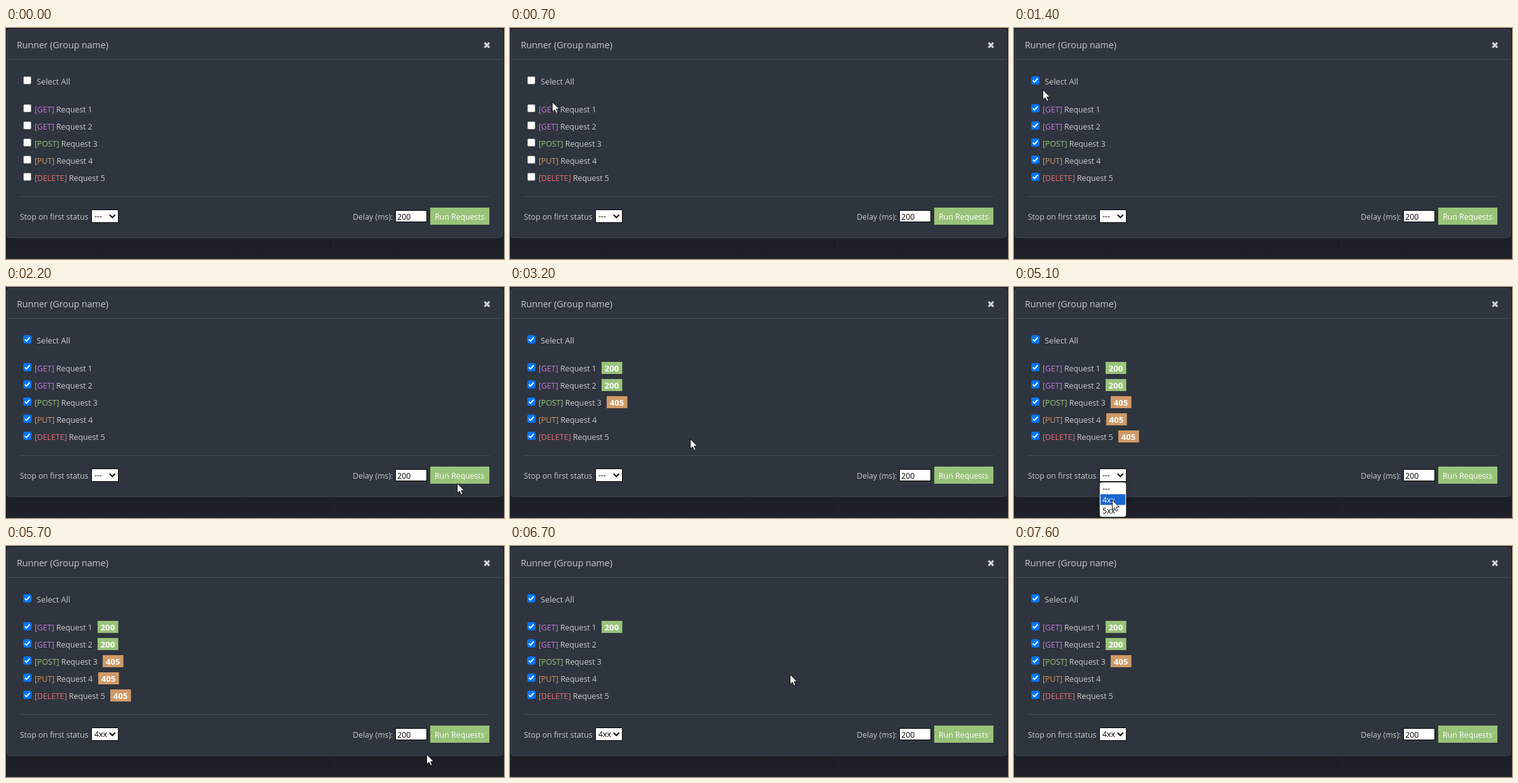
An HTML page that plays this animation: 783x364 px, repeating every 8000 ms.

```html
<!DOCTYPE html>
<html lang="en">
<head>
<meta charset="utf-8">
<title>Request runner</title>
<style>
  html, body { margin: 0; width: 100%; height: 100%; overflow: hidden; background: #1f222a; }
  svg { display: block; width: 783px; height: 364px; }
  text { font: 12.3px "Open Sans", "Noto Sans", sans-serif; fill: #c8cacd; white-space: pre; }
  .title { font-size: 14.2px; }
  .all { font-size: 12.7px; }
  .field { fill: #000; }
  .badge text { font-size: 13px; font-weight: 700; fill: #fff; }
  .frame { fill: #0002; stroke: #43484f; stroke-width: 2; filter: drop-shadow(0 2px 5px #0006); }
</style>
</head>
<body>
<svg id="stage" viewBox="0 0 783 364">
  <defs>
    <linearGradient id="shade" x2="0" y2="1">
      <stop offset="0" stop-color="#1b1e25"/>
      <stop offset="1" stop-color="#1f222a"/>
    </linearGradient>
  </defs>
  <rect width="783" height="364" fill="#1f222a"/>
  <rect y="328" width="783" height="36" fill="url(#shade)"/>
  <path d="M515.5 331V364" stroke="#252830"/>
  <rect x="1.5" y="2.5" width="779" height="328" rx="4" fill="#2f353e" stroke="#3d434c"/>
  <path d="M2 49.5H780M22 265.5H760" stroke="#474d56"/>
  <text class="title" x="17" y="32">Runner (Group name)</text>
  <path d="M752.4 23.2l7.6 7.6m0-7.6l-7.6 7.6" stroke="#d0d2d4" stroke-width="3.2"/>
  <text class="all" x="48.3" y="89">Select All</text>
  <g id="rows"></g>

  <text x="21.7" y="302">Stop on first status</text>
  <rect x="134.5" y="286.5" width="42" height="20" fill="#fff" stroke="#000"/>
  <text id="status" class="field" x="139" y="301">---</text>
  <path d="M162.8 294.2l4.4 4.4 4.4-4.4" fill="none" stroke="#000" stroke-width="2"/>

  <text x="545.3" y="302">Delay (ms):</text>
  <rect x="612.5" y="287.5" width="49" height="18" fill="#fff" stroke="#000"/>
  <text class="field" x="615.3" y="302">200</text>
  <rect x="667" y="283" width="93" height="27" fill="#98c379"/>
  <text x="674" y="302" style="fill:#fff">Run Requests</text>

  <g id="popup">
    <rect class="frame" x="135" y="308" width="41" height="54" rx="6"/>
    <g id="options"><rect x="135" y="308" width="41" height="54" rx="3" fill="#fff"/></g>
  </g>
  <path id="cursor" d="M.5.5V16L4.1 12.7 6.5 18.3 9 17.2 6.7 11.8H11.6Z" fill="#fff" stroke="#000" stroke-width=".9"/>
</svg>
<script>
const LOOP = 8000, TICK = 100, DELAY = 200;
const CHECK = 1400, OPEN = 4400, PICK = 5300, RUN = 2000, RERUN = 6100;
const GREEN = '#98c379', ORANGE = '#d19a66';
const $ = id => document.getElementById(id);

function add(parent, tag, attrs, label) {
  const el = document.createElementNS('http://www.w3.org/2000/svg', tag);
  for (const key in attrs) el.setAttribute(key, attrs[key]);
  if (label) el.textContent = label;
  return parent.appendChild(el);
}
const show = (el, on) => el.setAttribute('visibility', on ? 'visible' : 'hidden');

const requests = [
  { method: 'GET', color: '#c678dd', code: 200, reply: 200 },
  { method: 'GET', color: '#c678dd', code: 200, reply: 200 },
  { method: 'POST', color: GREEN, code: 405, reply: 200 },
  { method: 'PUT', color: ORANGE, code: 405, reply: 50 },
  { method: 'DELETE', color: '#e06c75', code: 405, reply: 50 }
];

function checkbox(y) {
  const g = add($('rows'), 'g', { transform: `translate(27 ${y})` });
  const box = add(g, 'rect', { x: .5, y: .5, width: 12, height: 12, rx: 2 });
  const tick = add(g, 'path', { d: 'M2.6 6.6L5.2 9.2 10.4 3.5', fill: 'none', stroke: '#fff', 'stroke-width': 1.9 });
  return { box, tick };
}

function paintBox({ box, tick }, checked) {
  box.setAttribute('fill', checked ? '#0075ff' : '#fff');
  box.setAttribute('stroke', checked ? '#0075ff' : '#767676');
  show(tick, checked);
}

const checks = [checkbox(76)];
const badges = requests.map(({ method, color, code }, i) => {
  const y = 120 + 27 * i;
  checks.push(checkbox(y));
  const line = add($('rows'), 'text', { x: 45, y: y + 13 });
  add(line, 'tspan', { style: `fill:${color}` }, `[${method}]`);
  add(line, 'tspan', {}, ` Request ${i + 1}`);
  const x = Math.round(45 + line.getComputedTextLength() + 8.2);
  const badge = add($('rows'), 'g', { class: 'badge', transform: `translate(${x} ${y - 2})` });
  add(badge, 'rect', { width: 32.5, height: 19, fill: code === 200 ? GREEN : ORANGE });
  add(badge, 'text', { x: 4.8, y: 15 }, code);
  return badge;
});

const options = ['---', '4xx', '5xx'].map((name, i) => {
  const y = 309 + 17.5 * i;
  const bar = add($('options'), 'rect', { x: 136, y, width: 39, height: 17 });
  const label = add($('options'), 'text', { x: 139, y: y + 13 }, name);
  return { bar, label };
});

// Pointer moves: leave time, arrival time, x, y; it rests in between.
const moves = [
  [100, 200, 58, 32], [200, 500, 84, 134], [500, 1000, 33, 83],
  [1300, 1400, 45, 97], [1400, 2000, 709, 309], [2200, 2400, 463, 332],
  [2500, 2900, 283, 239], [3300, 3700, 243, 278], [3800, 4400, 154, 301],
  [4400, 4600, 178, 316], [4700, 4900, 154, 335], [5200, 5700, 661, 328],
  [5700, 5900, 693, 297], [6000, 6700, 440, 202], [6800, 7400, 119, -13]
];
const ease = k => k * k * (3 - 2 * k);

function pointAt(t) {
  let x = 0, y = 0;
  for (const [leave, arrive, toX, toY] of moves) {
    if (t <= leave) break;
    const k = ease(Math.min(1, (t - leave) / (arrive - leave)));
    x += (toX - x) * k;
    y += (toY - y) * k;
  }
  return [Math.round(x), Math.round(y)];
}

// Each request waits for the one before; a matching status ends the run.
function drawRun(t) {
  const again = t >= RERUN;
  let due = again ? RERUN : RUN, stopped = false;
  requests.forEach(({ code, reply }, i) => {
    due += DELAY + reply;
    show(badges[i], t >= due && !stopped);
    stopped ||= again && code >= 400;
  });
}

function drawSelect(t) {
  $('status').textContent = t >= PICK ? '4xx' : '---';
  $('popup').style.display = t >= OPEN && t < PICK ? '' : 'none';
  $('options').style.display = t > OPEN ? '' : 'none';
  const active = pointAt(t)[1] > 325 ? 1 : 0;
  options.forEach(({ bar, label }, i) => {
    bar.setAttribute('fill', i === active ? '#1967d2' : '#fff');
    label.style.fill = i === active ? '#fff' : '#000';
  });
}

function draw(t) {
  checks.forEach(check => paintBox(check, t >= CHECK));
  drawRun(t);
  drawSelect(t);
  show($('cursor'), t >= 200 && t < 7600);
  $('cursor').setAttribute('transform', `translate(${pointAt(t)})`);
}

const start = performance.now();
function frame() {
  const t = (performance.now() - start) % LOOP;
  draw(Math.floor(t / TICK) * TICK);
  requestAnimationFrame(frame);
}
frame();
</script>
</body>
</html>
```
